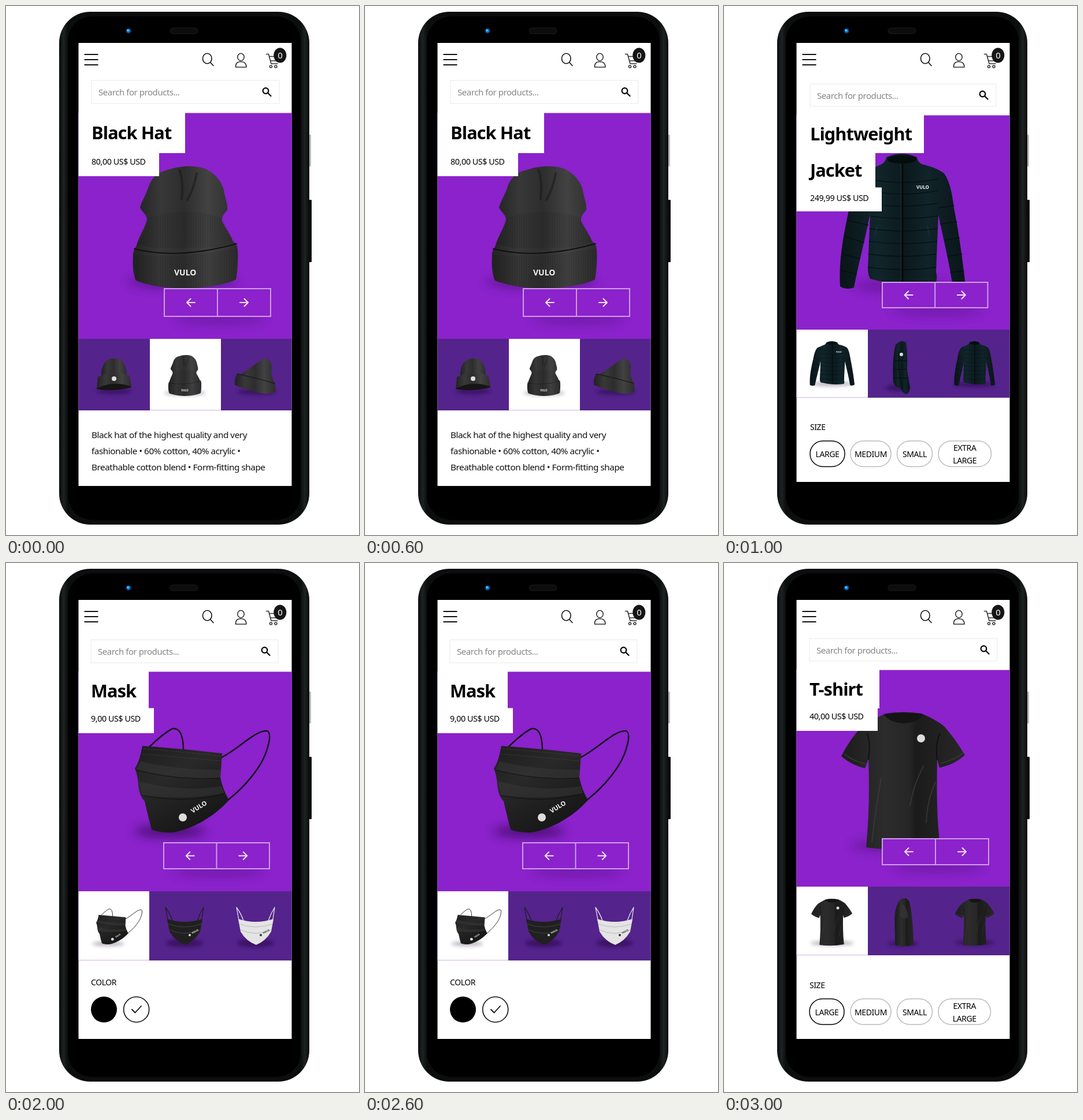
An HTML page that plays this animation: 611x917 px, repeating every 4 s.

```html
<!DOCTYPE html>
<html lang="en">
<head>
<meta charset="utf-8">
<title>Shop on a phone</title>
<style>
html, body { margin: 0; width: 100%; height: 100%; overflow: hidden; background: #fff; }
svg { display: block; width: 611px; height: 917px; }
text { font-family: "Noto Sans", "Open Sans", sans-serif; letter-spacing: -.03em; }
.title { font-size: 30.7px; font-weight: 700; }
.price { font-size: 14.3px; font-weight: 500; }
.label { font-size: 14px; font-weight: 500; }
.body { font-size: 15.3px; fill: #111; }
.hint { font-size: 15px; fill: #858585; }
.brand { font-weight: 700; fill: #f4f4f4; letter-spacing: 0; }
.mid { text-anchor: middle; }
.line { fill: none; stroke-linecap: round; stroke-linejoin: round; }
</style>
</head>
<body>
<svg viewBox="0 0 611 917">
  <defs>
    <linearGradient id="edge">
      <stop offset="0" stop-color="#0a0c0c"/><stop offset=".018" stop-color="#1d2222"/>
      <stop offset=".035" stop-color="#0c0e0e"/><stop offset=".965" stop-color="#0c0e0e"/>
      <stop offset=".982" stop-color="#1d2222"/><stop offset="1" stop-color="#0a0c0c"/>
    </linearGradient>
    <linearGradient id="wool">
      <stop offset="0" stop-color="#222"/><stop offset=".25" stop-color="#383838"/>
      <stop offset=".48" stop-color="#2d2d2d"/><stop offset=".72" stop-color="#424242"/>
      <stop offset="1" stop-color="#2c2c2c"/>
    </linearGradient>
    <linearGradient id="down">
      <stop offset="0" stop-color="#091417"/><stop offset=".3" stop-color="#10262b"/>
      <stop offset=".52" stop-color="#0b191d"/><stop offset=".7" stop-color="#10242a"/>
      <stop offset="1" stop-color="#0a1518"/>
    </linearGradient>
    <linearGradient id="cloth">
      <stop offset="0" stop-color="#1c1c1c"/><stop offset=".35" stop-color="#2c2c2c"/>
      <stop offset=".55" stop-color="#262626"/><stop offset=".6" stop-color="#1b1b1b"/>
      <stop offset="1" stop-color="#272727"/>
    </linearGradient>
    <linearGradient id="gauze" x2=".6" y2="1">
      <stop offset="0" stop-color="#1d1d1d"/><stop offset=".4" stop-color="#292929"/>
      <stop offset="1" stop-color="#161616"/>
    </linearGradient>
    <pattern id="rib" width="3" height="8" patternUnits="userSpaceOnUse">
      <path d="M.5 0V8" stroke="#000" stroke-opacity=".22"/>
    </pattern>
    <filter id="blur" x="-50%" y="-150%" width="200%" height="400%"><feGaussianBlur stdDeviation="9"/></filter>
    <filter id="soft" x="-50%" y="-150%" width="200%" height="400%"><feGaussianBlur stdDeviation="3"/></filter>

    <g id="hat">
      <path fill="url(#wool)" d="M224 424C227 402 242 384 244 369C243 361 235 357 232 349C235 338 243 326 248 310C254 295 266 287 280 284C300 277 325 275 345 282C365 292 376 308 378 325C381 338 384 345 383 354C376 361 373 367 374 373C382 390 392 398 398 424Z"/>
      <path fill="url(#rib)" d="M226 420Q242 390 246 368Q310 345 373 368Q389 395 398 418Z"/>
      <path class="line" stroke="#161616" stroke-width="4" stroke-opacity=".5" d="M300 284Q307 300 304 335M330 290Q326 315 314 336"/>
      <path fill="url(#wool)" d="M220 430C222 414 232 412 240 416C290 429 350 426 388 411C396 406 400 412 401 422C402 440 401 460 398 474C375 486 330 490 305 490C275 489 245 484 225 476C219 462 219 445 220 430Z"/>
      <path fill="url(#rib)" d="M221 430Q300 440 401 420L398 474Q310 505 225 476Z"/>
      <path class="line" stroke="#111" stroke-width="2" d="M222 421Q300 440 399 412"/>
      <text class="brand" x="291" y="467" font-size="14">VULO</text>
    </g>

    <g id="jacket">
      <path fill="url(#down)" d="M281 262Q308 250 334 262Q335 270 342 274Q368 280 381 290C392 306 395 328 398 350C406 390 413 440 418 484Q406 493 396 487C390 445 380 405 371 362L367 460Q370 474 366 480Q310 489 253 473Q249 466 249 455L253 360C244 405 232 450 225 488Q212 493 201 486C198 440 208 390 217 350C222 320 228 300 238 290Q260 280 273 274Q280 270 281 262Z"/>
      <ellipse cx="308" cy="266" rx="25" ry="7" fill="#050c0e"/>
      <path class="line" stroke="#050b0d" stroke-width="1.4" stroke-opacity=".7" d="M250 300Q308 312 370 300M250 320Q308 332 370 320M252 342Q308 352 370 342M253 364Q308 373 370 364M252 386Q308 394 369 386M251 408Q308 416 368 408M250 430Q308 438 367 430M250 453Q308 461 367 453M220 345L250 352M215 372L250 380M209 400L242 410M205 430L235 438M203 458L229 465M372 350L398 346M374 378L403 374M382 406L408 402M388 434L412 430M392 462L415 459"/>
      <path class="line" stroke="#04090a" stroke-width="3" d="M309 272V482"/>
      <path class="line" stroke="#27434a" stroke-opacity=".6" d="M306 274V480M265 381L261 400M352 381L356 400"/>
    </g>

    <g id="mask">
      <path class="line" stroke="#17101c" stroke-width="2.5" d="M249 318Q275 293 289 287Q306 285 307 322M373 337C402 323 432 289 452 291C462 296 452 330 439 351Q418 384 384 411"/>
      <path fill="url(#gauze)" d="M236 317Q305 322 374 330L371 372Q375 392 386 411C360 440 325 460 290 467Q265 468 252 462Q246 440 240 413Q231 405 229 385Q228 368 223 356Q231 345 236 317Z"/>
      <path fill="#3a3a3a" fill-opacity=".45" d="M233 344Q300 360 371 358V372Q300 377 226 358ZM229 378Q300 398 373 387L378 399Q310 412 236 402Z"/>
      <path class="line" stroke="#0c0c0c" stroke-opacity=".7" d="M226 359Q300 378 371 373M236 403Q310 418 378 400"/>
      <path class="line" stroke="#555" stroke-opacity=".7" stroke-dasharray="1 3" d="M239 322Q305 327 373 335M237 331Q305 337 372 343"/>
      <circle cx="306" cy="441" r="7" fill="#ddd"/>
      <text class="brand" font-size="11" transform="translate(323 434)rotate(-32)">VULO</text>
    </g>

    <g id="shirt">
      <path fill="url(#cloth)" d="M279 261Q310 256 342 261Q368 272 381 283C396 300 408 318 417 333Q400 349 373 355L369 340C368 390 368 440 374 490Q310 502 246 493Q253 420 250 340L244 356Q220 350 203 335Q218 305 238 284Q258 271 279 261Z"/>
      <path fill="#141414" d="M277 262Q310 256 344 262Q338 276 311 278Q284 276 277 262Z"/>
      <path class="line" stroke="#3d3d3d" stroke-width="2" stroke-opacity=".7" d="M272 372Q262 430 256 484M345 352Q328 385 322 420M366 380Q352 410 350 450M208 331Q225 344 244 348M376 347Q400 341 413 330"/>
      <path class="line" stroke="#111" stroke-width="2" d="M250 340Q254 312 248 296M369 340Q365 312 374 296"/>
    </g>

    <g id="hatLow">
      <path fill="url(#wool)" d="M165 642C164 626 170 613 184 611C200 609 209 619 209 642Z"/>
      <path fill="#151515" d="M159 654Q187 644 216 654L217 661Q187 669 157 664Z"/>
      <path fill="url(#wool)" d="M159 643Q187 630 214 641L217 660Q187 648 157 663Z"/>
      <circle cx="187" cy="646" r="4" fill="#ddd"/>
    </g>
    <g id="hatTilt">
      <path fill="url(#wool)" d="M401 641C418 632 432 619 447 611C458 611 461 622 460 628Q457 636 465 655Z"/>
      <path fill="url(#wool)" d="M400 637C425 642 448 651 466 653L467 668Q455 675 440 671Q415 665 396 657Q395 645 400 637Z"/>
      <path class="line" stroke="#111" d="M401 638Q430 644 465 654"/>
    </g>
    <g id="jacketSide">
      <path fill="url(#down)" d="M297 587Q306 578 315 583C318 600 317 620 317 632L322 660Q322 672 314 673Q308 669 306 663Q296 662 293 652C292 630 292 605 297 587Z"/>
      <path class="line" stroke="#050b0d" d="M303 600Q300 630 309 664M295 615H316M294 630H316M294 645H318"/>
      <circle cx="307" cy="604" r="3" fill="#ddd"/>
    </g>
    <g id="shirtSide">
      <path fill="url(#cloth)" d="M305 584Q314 577 321 587C326 610 328 640 328 662Q312 666 296 662C297 640 293 612 298 598Q300 588 305 584Z"/>
      <path fill="#343434" fill-opacity=".8" d="M305 592Q315 588 319 614Q311 619 304 612Z"/>
    </g>
    <g id="maskFront">
      <path class="line" stroke="currentColor" stroke-width="1.3" d="M281 624L276 597Q284 608 288 620M338 624L342 597Q335 608 331 620"/>
      <path fill="currentColor" d="M279 617Q309 627 340 617L336 639Q326 656 310 662Q293 656 283 639Z"/>
      <path class="line" stroke="#777" stroke-opacity=".4" d="M281 626Q309 636 338 626M283 636Q309 648 336 636"/>
    </g>
  </defs>

  <rect x="524" y="223" width="4" height="55" rx="1" fill="#b9b9b9"/>
  <rect x="523" y="336" width="6" height="108" rx="1" fill="#080808"/>
  <rect x="92" y="10" width="433" height="889" rx="54" fill="url(#edge)"/>
  <rect x="107" y="18" width="403" height="873" rx="42"/>
  <rect x="284" y="38" width="48" height="10" rx="5" fill="#0d0d0d" stroke="#1d1d1d"/>
  <circle cx="212" cy="43" r="5" fill="#0a2a55"/>
  <circle cx="212" cy="43" r="3" fill="#0d8be0"/>
  <circle cx="211" cy="42" r="1.3" fill="#8fe4ff"/>

  <g id="page"></g>

  <g class="line" stroke="#111" stroke-width="1.6">
    <path stroke-width="2" stroke-linecap="butt" d="M135.500 84H159.500M135.500 93H159.500M135.500 102H159.500"/>
    <ellipse cx="348.300" cy="91" rx="7.800" ry="8.800"/>
    <path d="M354 98L359 103.500"/>
    <g stroke="#333">
      <ellipse cx="406.500" cy="88.500" rx="5.700" ry="6.300"/>
      <path d="M397.500 106Q397 96.500 406.500 96.500Q416 96.500 416 106Z"/>
      <path d="M450.500 83.500H454.500L459 100H470M455.500 87.500H466M457.500 95H469"/>
      <circle cx="458.500" cy="105" r="2"/><circle cx="467" cy="105" r="2"/>
    </g>
  </g>
  <ellipse cx="474.300" cy="85.500" rx="11" ry="13" fill="#151515"/>
  <text class="mid" x="474.300" y="91" font-size="15" fill="#fff">0</text>
</svg>

<script>
const PURPLE = "#8b22cc", DARK = "#55238c", LEFT = 125.5, RIGHT = 494.5;
const rect = (x, y, r, b, more) => `<rect x="${x}" y="${y}" width="${r - x}" height="${b - y}" ${more}/>`;
const text = (cls, x, y, s, more = "") => `<text class="${cls}" x="${x}" y="${y}" ${more}>${s}</text>`;
const use = (id, at = "", more = "") => `<use href="#${id}" transform="${at}" ${more}/>`;
const dot = (x, y, r) => `<circle cx="${x}" cy="${y}" r="${r}" fill="#ddd"/>`;
const brand = (x, y, size) => text("brand", x, y, "VULO", `font-size="${size}"`);
const shade = (x, y, rx, ry, fx = "soft", a = .45) =>
  `<ellipse cx="${x}" cy="${y}" rx="${rx}" ry="${ry}" fill="#1d0636" opacity="${a}" filter="url(#${fx})"/>`;

function sizes(x, y) {
  const pill = (l, r, s, color = "#bbb") => rect(l, y, r, y + 44.5, `rx="22" fill="#fff" stroke="${color}" stroke-width="1.5"`)
    + [].concat(s).map((w, i, all) => text("label mid", (l + r) / 2, y + 28 + (i - (all.length - 1) / 2) * 22, w)).join("");
  return text("label", x, y - 19, "SIZE") + pill(x, x + 60, "LARGE", "#000") + pill(219, 289, "MEDIUM")
    + pill(299.5, 360.5, "SMALL") + pill(371, x + 313.5, ["EXTRA", "LARGE"]);
}

// search: left, top, right, bottom; stage: top, bottom; blocks: right, bottom
const scenes = [
  {
    search: [148, 129, 473, 169], end: 832, stage: [185.5, 577], tabs: [249, 372, 701], active: 1,
    blocks: [[310, 255], [265, 295]], titles: [["Black Hat", 231]], price: ["80,00 US$ USD", 275],
    arrows: [274, 490, 458, 538],
    art: shade(305, 478, 95, 11, "blur", .4) + use("hat"),
    thumbs: shade(187, 668, 30, 5) + use("hatLow") + shade(310, 671, 36, 4, "soft", .3)
      + use("hat", "matrix(.315 0 0 .335 211.700 511.900)") + shade(434, 669, 34, 5) + use("hatTilt"),
    info: ["Black hat of the highest quality and very", "fashionable • 60% cotton, 40% acrylic •",
      "Breathable cotton blend • Form-fitting shape"].map((s, i) => text("body", 148, 749 + i * 28, s)).join("")
  },
  {
    search: [149, 135, 471, 174], end: 825, stage: [189.5, 561], tabs: [249, 372, 679], active: 0,
    blocks: [[346, 255], [262, 315], [273, 356]], titles: [["Lightweight", 233], ["Jacket", 296]], price: ["249,99 US$ USD", 338],
    arrows: [274, 479, 456.5, 523],
    art: shade(310, 486, 85, 10, "blur", .3) + use("jacket") + brand(333, 317, 8),
    thumbs: shade(187, 655, 38, 4, "soft", .3) + use("jacket", "matrix(.356 0 0 .330 77.200 496.500)") + brand(194, 601, 3.5)
      + shade(300, 662, 20, 6) + use("jacketSide") + shade(433, 656, 36, 5) + use("jacket", "matrix(.325 0 0 .330 333.300 496.500)"),
    info: sizes(149, 754)
  },
  {
    search: [147, 133, 471, 173], end: 825, stage: [188.5, 569], tabs: [248, 371, 689], active: 0,
    blocks: [[247, 252], [256, 295]], titles: [["Mask", 233]], price: ["9,00 US$ USD", 275],
    arrows: [273, 485, 456, 530],
    art: shade(284, 465, 62, 10, "blur", .6) + use("mask"),
    thumbs: shade(177, 660, 28, 4, "soft", .3) + use("mask", "matrix(.341 0 0 .341 80 501.800)")
      + [["#202020", 0], ["#e4e4e4", 123]].map(([c, x]) => `<g transform="translate(${x})">${shade(309, 659, 32, 7)}`
        + use("maskFront", "", `color="${c}"`) + `<circle cx="318" cy="645" r="2" fill="${x ? "#333" : "#ddd"}"/>`
        + text("brand", 0, 0, "VULO", `font-size="4.500" transform="translate(322.500 643)rotate(-28)" style="fill:${x ? "#333" : "#eee"}"`) + "</g>").join(""),
    info: text("label", 147, 732, "COLOR") + '<circle cx="169.500" cy="774" r="22.500"/>'
      + '<circle cx="225.700" cy="774" r="22" fill="#fff" stroke="#111" stroke-width="1.600"/>'
      + '<path class="line" stroke="#111" stroke-width="1.800" d="M218 774L223.500 779.500L234 768"/>'
  },
  {
    search: [148, 131, 473, 170], end: 825, stage: [185.5, 561], tabs: [249, 372, 680], active: 0,
    blocks: [[269, 252], [266, 291]], titles: [["T-shirt", 230]], price: ["40,00 US$ USD", 271],
    arrows: [274, 478, 458, 523],
    art: shade(300, 490, 80, 9, "blur", .35) + use("shirt") + dot(341, 304, 7),
    thumbs: shade(187, 659, 38, 4, "soft", .3) + use("shirt", "matrix(.332 0 0 .340 83.600 494.300)") + dot(197, 598, 2.5)
      + shade(310, 660, 26, 5) + use("shirtSide") + shade(434, 658, 34, 5) + use("shirt", "matrix(.318 0 0 .340 335.400 494.300)"),
    info: sizes(148, 755.5)
  }
];

function draw(s) {
  const [l, t, r, b] = s.search, [top, bottom] = s.stage, [a, c, low] = s.tabs, [ax, ay, ar, ab] = s.arrows;
  const my = (t + b) / 2, mid = (ax + ar) / 2, ym = (ay + ab) / 2, q = (ar - ax) / 4;
  const cols = [LEFT, a, c, RIGHT], k = s.active;
  return rect(LEFT, 64, RIGHT, s.end, 'fill="#fff"')
    + rect(l, t, r, b, 'fill="#fff" stroke="#e9e9e9"') + text("hint", l + 12, my + 6, "Search for products...")
    + `<g class="line" stroke="#000" stroke-width="2.200"><circle cx="${r - 23.5}" cy="${my - 2}" r="4.800"/><path d="M${r - 19.5} ${my + 2}l5 5"/></g>`
    + rect(LEFT, top, RIGHT, bottom, `fill="${PURPLE}"`) + s.art
    + s.blocks.map(([x, y], i) => rect(LEFT, i ? s.blocks[i - 1][1] - .5 : top - .5, x, y, 'fill="#fff"')).join("")
    + s.titles.map(([w, y]) => text("title", l, y, w)).join("") + text("price", l, s.price[1], s.price[0])
    + shade(mid + 4, ab + 5, 80, 8, "blur", .25)
    + rect(ax, ay, ar, ab, `fill="${PURPLE}" stroke="#cf9dec" stroke-width="2"`)
    + `<path class="line" stroke="#cf9dec" stroke-width="2" d="M${mid} ${ay}V${ab}"/>`
    + `<path class="line" stroke="#f3e4fb" stroke-width="2" d="M${mid - q + 7} ${ym}h-14m6.500 -6.500l-6.500 6.500l6.500 6.500M${mid + q - 7} ${ym}h14m-6.500 -6.500l6.500 6.500l-6.500 6.500"/>`
    + rect(LEFT, bottom, RIGHT, low, `fill="${DARK}"`) + rect(cols[k], bottom, cols[k + 1], low, 'fill="#fff"')
    + rect(cols[k], low - 1, cols[k + 1], low, 'fill="#d0b4e2"') + s.thumbs + s.info;
}

const page = document.getElementById("page");
page.innerHTML = scenes.map(s => `<g display="none">${draw(s)}</g>`).join("");
const start = performance.now();
function tick() {
  const now = Math.floor((performance.now() - start) % 4000 / 1000);
  [...page.children].forEach((g, i) => g.setAttribute("display", i === now ? "inline" : "none"));
  requestAnimationFrame(tick);
}
tick();
</script>
</body>
</html>
```
